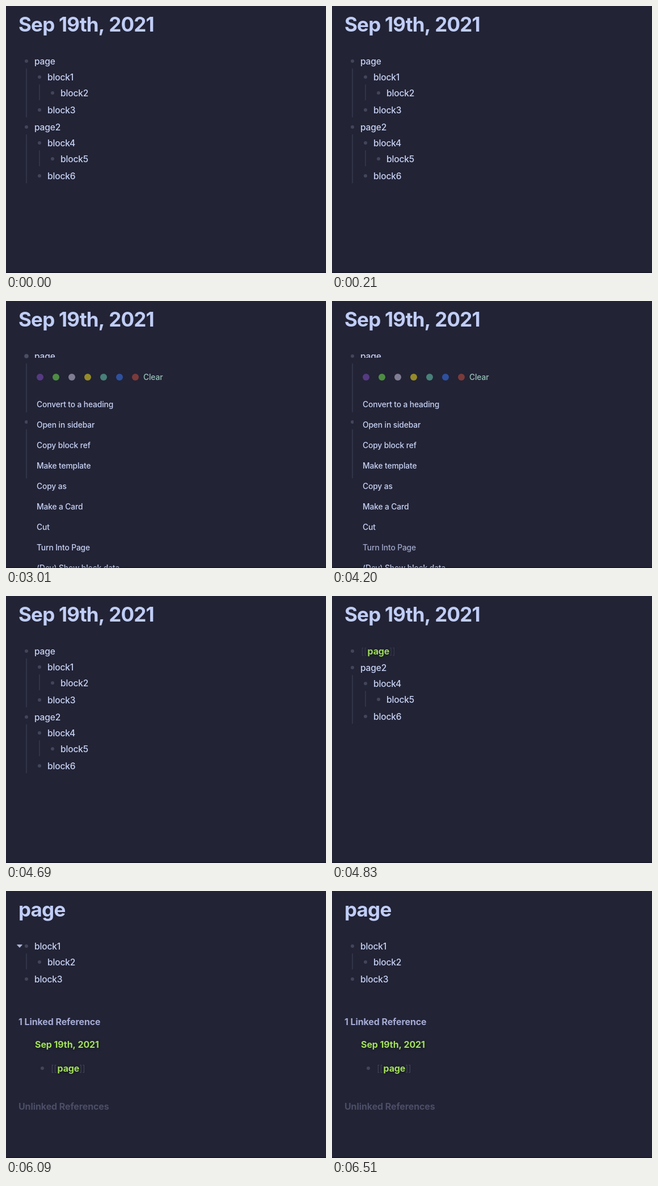
These frames come from a looping animation (564 by 470 pixels, 7420 ms). An HTML page with a canvas:

```html
<!DOCTYPE html>
<html lang="en">
<head>
<meta charset="utf-8">
<title>Turn a block into a page</title>
<style>
  html, body { margin: 0; width: 100%; height: 100%; overflow: hidden; background: #222335; }
  canvas { display: block; width: 564px; height: 470px; }
</style>
</head>
<body>
<canvas id="stage"></canvas>
<script>
const W = 564, H = 470, LOOP = 7420;
const BG = '#222335', INK = '#c8d3f5', TITLE = '#c0cdf5', GREEN = '#a5e05f';
const FONT = 'Inter, "Open Sans", sans-serif';
const canvas = document.getElementById('stage');
const ctx = canvas.getContext('2d');
const dpr = window.devicePixelRatio || 1;
canvas.width = W * dpr;
canvas.height = H * dpr;
ctx.scale(dpr, dpr);

const BODY = { color: INK, size: 15.6, weight: 450, track: -0.2 };
const MENU = { color: INK, size: 13.8, weight: 450, track: -0.12 };
const BOLD = { color: GREEN, size: 16, weight: 650, track: -0.1 };
const HEAD = { color: TITLE, size: 35, weight: 680, track: -0.8 };

function text(str, x, y, style, color = style.color) {
  ctx.font = `${style.weight} ${style.size}px ${FONT}`;
  ctx.letterSpacing = style.track + 'px';
  ctx.fillStyle = color;
  ctx.fillText(str, x, y);
}

function dot(x, y, r, color) {
  ctx.fillStyle = color;
  ctx.beginPath();
  ctx.arc(x, y, r, 0, Math.PI * 2);
  ctx.fill();
}

const bullet = (x, y, hot) => dot(x, y, hot ? 3.8 : 3, hot ? '#4b4d63' : '#43455a');

function guide(x, top, bottom) {
  ctx.fillStyle = '#313347';
  ctx.fillRect(x - 1, top, 2, bottom - top);
}

function arrow(y) {
  ctx.fillStyle = ctx.strokeStyle = '#b0b8da';
  ctx.lineWidth = 1;
  ctx.lineJoin = 'round';
  ctx.beginPath();
  ctx.moveTo(19.6, y - 2.2);
  ctx.lineTo(28.4, y - 2.2);
  ctx.lineTo(24, y + 2.4);
  ctx.closePath();
  ctx.fill();
  ctx.stroke();
}

function row(str, level, y, hot) {
  const x = 36 + level * 23;
  bullet(x, y, hot);
  text(str, x + 14, y + 6, BODY);
}

const title = str => text(str, 22, 45, HEAD);

function tree(names, y, hot) {
  guide(36, y + 13, y + 99);
  guide(59, y + 41, y + 69);
  row(names[0], 0, y, hot);
  row(names[1], 1, y + 28);
  row(names[2], 2, y + 56);
  row(names[3], 1, y + 86);
}

const first = ['page', 'block1', 'block2', 'block3'];
const second = ['page2', 'block4', 'block5', 'block6'];

function glowText(str, x, y, color) {
  ctx.shadowColor = '#12200f';
  ctx.shadowBlur = 4 * dpr;
  ctx.shadowOffsetY = dpr;
  text(str, x, y, BOLD, color);
  ctx.shadowColor = 'transparent';
}

function link(x, y, edge, color) {
  const thin = { ...BODY, weight: 300 };
  text('[[', x, y, thin, edge);
  glowText('page', x + 11.5, y, color);
  text(']]', x + 50, y, thin, edge);
}

const swatches = ['#553a82', '#4d8d42', '#7e7d93', '#958a28', '#478079', '#2d509e', '#7b3a3a'];
const items = ['Convert to a heading', 'Open in sidebar', 'Copy block ref', 'Make template',
  'Copy as', 'Make a Card', 'Cut', 'Turn Into Page', '(Dev) Show block data'];

function menu(active) {
  ctx.fillStyle = BG;
  ctx.fillRect(38, 100, W, H);
  swatches.forEach((c, i) => dot(60 + i * 28, 134, 6, c));
  text('Clear', 242, 139, MENU, '#98c3b8');
  items.forEach((name, i) =>
    text(name, 54, 187 + i * 36, MENU, i === active ? '#a0a9c9' : INK));
}

function menuItemAt(t) {
  if (t < 3500) return -1;
  if (t < 3710) return Math.floor((t - 3500) / 70);
  return t < 4130 ? 3 : t < 4200 ? 6 : 7;
}

function outline(t) {
  title('Sep 19th, 2021');
  tree(first, 97, t >= 1960 && t < 3080);
  tree(second, 213);
  if (t >= 1890 && t < 3010) arrow(97);
  if (t >= 3010 && t < 4690) menu(menuItemAt(t));
}

function linked(t) {
  title('Sep 19th, 2021');
  bullet(36, 97);
  const k = Math.min(1, Math.max(0, (t - 5530) / 350));
  link(51, 103, '#3b3d50', `rgb(${160 + 6 * k}, ${218 + 8 * k}, 95)`);
  tree(second, 126);
  if (t >= 5320 && t < 5460) arrow(126);
}

function pageView(t) {
  title('page');
  guide(36, 110, 138);
  row('block1', 0, 97);
  row('block2', 1, 125);
  row('block3', 0, 155);
  if (t < 6510) arrow(97);
  text('1 Linked Reference', 22, 236, BOLD, '#a5abd4');
  glowText('Sep 19th, 2021', 51, 276);
  bullet(64, 312);
  link(79, 318, '#484a5d');
  text('Unlinked References', 22, 385, BOLD, '#4c4e67');
}

function draw(t) {
  ctx.fillStyle = BG;
  ctx.fillRect(0, 0, W, H);
  (t < 4760 ? outline : t < 6090 ? linked : pageView)(t);
  ctx.fillStyle = 'rgba(12, 12, 20, 0.35)';
  ctx.fillRect(0, 468, W, 2);
}

const start = performance.now();
function tick() {
  draw((performance.now() - start) % LOOP);
  requestAnimationFrame(tick);
}
tick();
</script>
</body>
</html>
```
